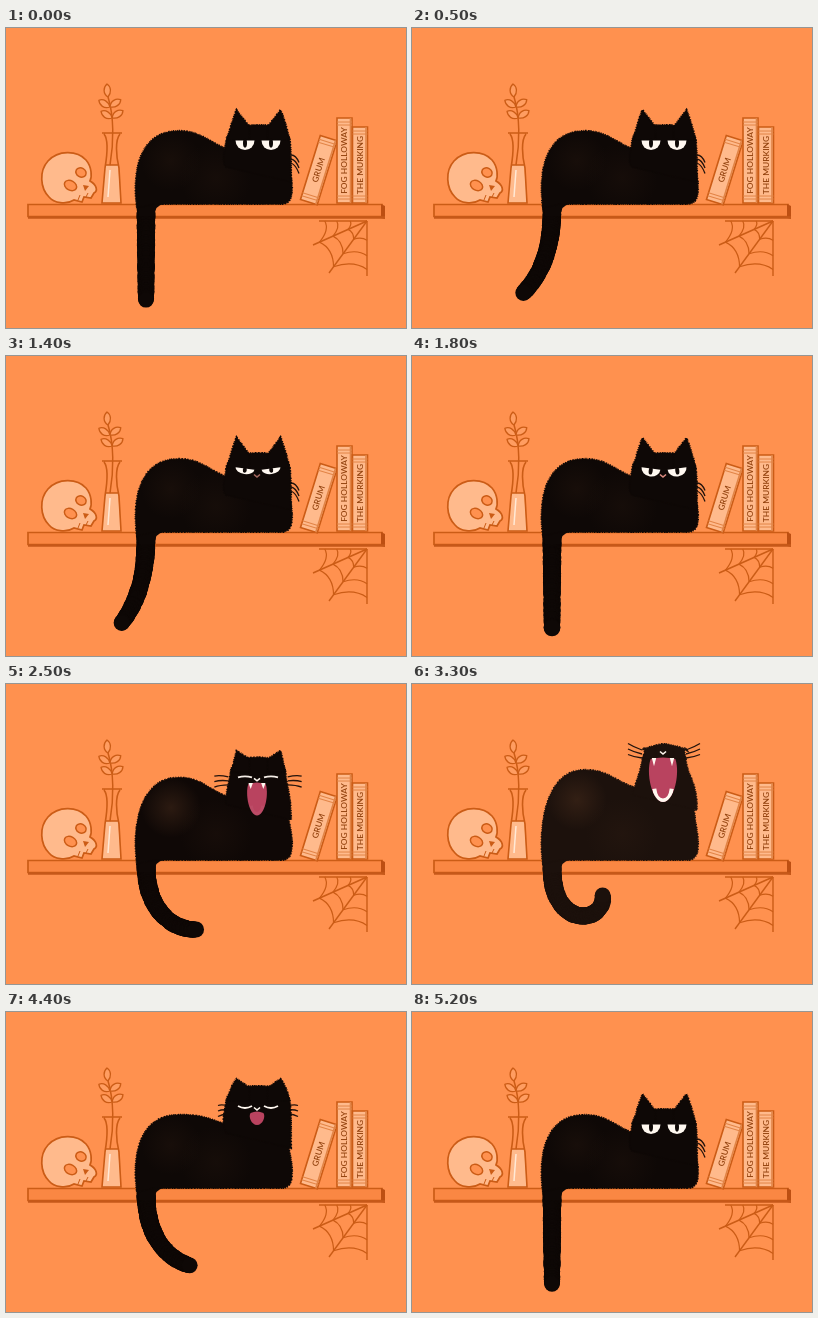
Write an HTML page with a canvas that moves like this. It is 400 px wide and 300 px high and loops after 5.3 s.

```html
<!DOCTYPE html>
<html lang="en">
<head>
<meta charset="utf-8">
<title>Yawning cat on a shelf</title>
<style>
html, body { margin: 0; width: 100%; height: 100%; overflow: hidden; background: #ff914f; }
canvas { display: block; width: 400px; height: 300px; }
</style>
</head>
<body>
<canvas id="stage" width="400" height="300"></canvas>
<script>
const LOOP = 5300, STEP = 100;
const BG = '#ff914f', LINE = '#cb5c16', PALE = '#ffba8c', WHITE = '#fff8f0';
const stage = document.getElementById('stage').getContext('2d');
let ctx = stage;
let fur;

function ramp(t, from, to) {
  const u = Math.min(1, Math.max(0, (t - from) / (to - from)));
  return u * u * (3 - 2 * u);
}

// Rises over the first interval and falls over the second.
const pulse = (t, a, b, c, d) => ramp(t, a, b) - ramp(t, c, d);

function randomFrom(seed) {
  return () => (seed = (seed * 16807 + 11) % 2147483647) / 2147483647;
}

// Raising the head, stretching and tilting it back drive the whole cat.
function poseAt(t) {
  const raise = pulse(t, 1900, 2500, 4400, 4900);
  const stretch = pulse(t, 2100, 2500, 3600, 4300);
  const tilt = pulse(t, 2400, 3200, 3600, 4300);
  const blink = pulse(t, 500, 700, 1200, 1500);
  const glare = pulse(t, 1200, 1400, 2300, 2500);
  const left = Math.sin(Math.PI * Math.min(1, t / 1800));
  const right = pulse(t, 1800, 2600, 4100, 5200);
  return {
    stretch, tilt, raise, glare,
    nose: pulse(t, 1200, 1500, 4600, 4900),
    open: Math.max(0, 1 - blink - raise - glare * 0.15),
    shut: raise * (1 - tilt),
    top: 97 - 23 * raise - 14 * tilt,
    half: 33 - 4 * stretch - 6 * tilt,
    ear: 15 + 3 * blink - 8 * raise - 13 * tilt,
    hump: 103 - 9 * stretch - 8 * tilt,
    shoulder: 121 - 8 * raise - 10 * tilt,
    mouthTop: 119 - 19 * raise - 26 * tilt,
    mouthW: 15 * raise + 5 * stretch + 9 * tilt,
    mouthH: 13 * raise + 19 * stretch + 12 * tilt,
    whiskerX: 285 - 3 * raise - 8 * tilt,
    whiskerY: 131 - 33 * raise - 28 * tilt,
    whiskerDrop: 9 - 8 * raise - 6 * tilt,
    whiskerLen: 8 + 2 * raise + 4 * stretch,
    bend: 1.6 * right + 1.75 * tilt - 1.03 * left,
    curl: 1.5 + tilt / 2,
    tailLength: 96 + 8 * tilt
  };
}

function shape(d, fill, stroke, width = 1.5) {
  const path = typeof d === 'string' ? new Path2D(d) : d;
  if (fill) { ctx.fillStyle = fill; ctx.fill(path); }
  if (stroke) { ctx.strokeStyle = stroke; ctx.lineWidth = width; ctx.stroke(path); }
}

function oval(x, y, rx, ry, turn, fill, stroke) {
  const path = new Path2D();
  path.ellipse(x, y, rx, ry, turn, 0, Math.PI * 2);
  shape(path, fill, stroke);
}

function at(x, y, angle, paint) {
  ctx.save();
  ctx.translate(x, y);
  ctx.rotate(angle);
  paint();
  ctx.restore();
}

function skull() {
  shape('M43 169 C34 160 33 143 42 133 C52 122 71 122 80 132 C86 139 86 149 84 153 C91 157 92 163 88 165 L85 170 L78 169 L76 174 L68 172 C60 177 48 175 43 169Z', PALE, LINE, 1.7);
  oval(64.5, 157.5, 6.5, 4.7, 0.5, BG, LINE);
  oval(75, 144.5, 5.3, 4.5, 0.5, BG, LINE);
  shape('M77 157 L83 158 L79 163Z', LINE);
  shape('M72 172 L74 167 M80 169 L82 165', null, LINE, 1);
}

function vase() {
  shape('M99 137 H112 L115 175 H96Z', PALE);
  shape('M96 105 H116 M98 106 C103 112 101 128 99 140 L96 175 H115 L113 140 C110 128 109 112 114 106 M99 137 H113', null, LINE, 1.6);
  shape('M104 142 L102 169', null, '#ffe9d6', 1.5);
  shape('M104 137 C108 114 108 88 102 69', null, LINE);
  const leaf = (x, y, angle) => at(x, y, angle, () =>
    shape('M0 0 C4 -5 10 -4 13 0 C10 4 4 4 0 0', '#ff9d61', LINE, 1.3));
  leaf(102, 69, -1.65);
  for (const y of [79, 90]) {
    leaf(104 + (y - 79) / 5, y, -2.6);
    leaf(104 + (y - 79) / 5, y, -0.6);
  }
}

function book(x, w, h, lean, title) {
  at(x, lean ? 171.5 : 175, lean, () => {
    shape(`M0 0 H${w} V${-h} H0Z`, PALE, LINE, 1.6);
    for (const y of [4, 7, h - 7, h - 4]) shape(`M0 ${-y} H${w}`, null, '#e28446', 1);
    shape(`M${w - 1.5} 0 V${-h}`, null, '#e28446', 1.6);
    ctx.rotate(-Math.PI / 2);
    ctx.font = '600 8.4px Lato, sans-serif';
    ctx.fillStyle = '#94430f';
    ctx.textAlign = 'center';
    ctx.textBaseline = 'middle';
    ctx.fillText(title, h / 2, w / 2);
  });
}

function web() {
  const spokes = [[-48, 0], [-54, 24], [-38, 52], [0, 55]];
  for (const [x, y] of spokes) shape(`M361 193 l${x} ${y}`, null, LINE, 1.4);
  for (const k of [0.35, 0.63, 0.88]) {
    for (let i = 0; i < 3; i++) {
      const [a, b] = [spokes[i], spokes[i + 1]].map(p => [361 + p[0] * k, 193 + p[1] * k]);
      const sag = (v, c) => (a[v] + b[v]) / 2 * 0.83 + c * 0.17;
      shape(`M${a} Q${sag(0, 361)} ${sag(1, 193)} ${b}`, null, LINE, 1.2);
    }
  }
}

function scene() {
  ctx.fillStyle = BG;
  ctx.fillRect(0, 0, 400, 300);
  web();
  shape('M22 176.5 H376 V188.5 H22Z', '#fa8743', LINE, 1.7);
  shape('M375 176 L379 178 V191 L375 190Z', '#bd4f12');
  shape('M22 189.5 H379', null, '#c65819', 2.6);
  skull();
  vase();
  book(294.5, 17.5, 67, 0.3, 'GRUM');
  book(331, 15, 85, 0, 'FOG HOLLOWAY');
  book(346.5, 15, 76, 0, 'THE MURKING');
}

// An irregular dashed edge reads as short hair.
function furry(d, seed) {
  const random = randomFrom(seed);
  const path = new Path2D(d);
  shape(path, fur, fur, 0.8);
  ctx.setLineDash(Array.from({ length: 30 }, () => 0.5 + random() * 1.3));
  shape(path, null, fur, 2.2);
  ctx.setLineDash([]);
  return path;
}

function tail(p, seed) {
  const random = randomFrom(seed);
  const count = 120, step = p.tailLength / count;
  let x = 140, y = 176;
  for (let i = 0; i <= count; i++) {
    const s = i / count, angle = p.bend * s ** p.curl;
    const r = 8.9 - 1.4 * s + random() * 0.9;
    oval(x, y, r, r, 0, fur);
    x += Math.sin(angle) * step;
    y += Math.cos(angle) * step;
  }
  shape('M131 168 H158 V176 Q149 177 148.5 188 L133 188Z', fur);
}

function glow(x, y, r, alpha) {
  const g = ctx.createRadialGradient(x, y, 0, x, y, r);
  g.addColorStop(0, `rgba(78, 48, 30, ${alpha})`);
  g.addColorStop(1, 'rgba(78, 48, 30, 0)');
  ctx.fillStyle = g;
  ctx.fillRect(x - r, y - r, r * 2, r * 2);
}

function body(p, seed) {
  const { shoulder: s, hump: h } = p;
  const path = furry(`M131 180 C126 142 134 ${h + 1} 171 ${h}
    C194 ${h - 1} 204 ${s - 6} 221 ${s} L280 ${s + 8}
    C284 145 286 150 286 160 C286 171 283 176 275 176 L148 176Z`, seed);
  ctx.save();
  ctx.clip(path);
  glow(165, h + 30, 30, 0.15 + p.stretch * 0.3);
  glow(210, 150, 36, 0.12);
  ctx.restore();
}

function head(p, seed) {
  const { top: y, half: w, ear: e, tilt } = p, x = 252;
  const flat = w * (0.72 - 0.32 * tilt);
  const jaw = Math.max(y + 42, p.shoulder + 8);
  furry(`M220 ${jaw} C${x - w - 4} ${y + 36} ${x - w} ${y + 26} ${x - w + 1} ${y + 17}
    C${x - w + 2} ${y + 6} ${x - flat} ${y} ${x} ${y}
    C${x + flat} ${y} ${x + w - 2} ${y + 6} ${x + w - 1} ${y + 17}
    C${x + w} ${y + 30} 285 ${y + 38} 285 ${jaw + 15}Z`, seed);
  for (const side of [-1, 1]) {
    const px = d => x + 0.5 + side * d;
    furry(`M${px(w - 2)} ${y + 15} Q${px(w - 5)} ${y} ${px(22)} ${y - e}
      Q${px(15)} ${y - e * 0.4} ${px(9)} ${y + 2} L${px(9)} ${y + 15}Z`, seed + side);
  }
}

function eyes(p) {
  for (const side of [-1, 1]) {
    const x = 252 + side * 13, y = p.top + 20, sag = 4 - 6 * p.stretch;
    if (p.open > 0.05) at(x, p.top + 15.5, -side * p.glare * 0.13, () => {
      const lid = new Path2D();
      lid.ellipse(0, 0, 9.5, 9.5 * p.open, 0, 0, Math.PI);
      shape(lid, WHITE);
      oval(0, 2.6 * p.open, 2, 4.6 * p.open, 0, fur);
    });
    ctx.globalAlpha = p.shut;
    shape(`M${x - 7} ${y} Q${x} ${y + sag} ${x + 7} ${y}`, null, WHITE, 1.8);
    ctx.globalAlpha = 1;
  }
}

function mouth(p) {
  const { mouthTop: y, mouthW: w, mouthH: h } = p, x = 251, r = w / 2;
  if (w > 1) {
    const gape = new Path2D(`M${x - r * 0.85} ${y + 1} Q${x} ${y - 2} ${x + r * 0.85} ${y + 1}
      C${x + r * 1.2} ${y + h * 0.35} ${x + r * 0.75} ${y + h} ${x} ${y + h}
      C${x - r * 0.75} ${y + h} ${x - r * 1.2} ${y + h * 0.35} ${x - r * 0.85} ${y + 1}Z`);
    shape(gape, '#b9435f');
    ctx.save();
    ctx.clip(gape);
    ctx.globalAlpha = p.tilt;
    shape(`M${x - r * 0.6} ${y + h * 0.7} Q${x - r * 0.5} ${y + h - 1.5} ${x} ${y + h - 1.5}
      Q${x + r * 0.5} ${y + h - 1.5} ${x + r * 0.6} ${y + h * 0.7}`, null, WHITE, 4);
    ctx.restore();
    ctx.globalAlpha = p.stretch;
    for (const side of [-1, 1]) {
      const fx = x + side * r * 0.62;
      shape(`M${fx - 2.2} ${y} h4.4 l-2.2 ${h * 0.19}Z`, WHITE);
    }
  }
  const ny = p.top + 23 - 14 * p.tilt;
  ctx.globalAlpha = p.nose;
  shape(`M${x - 3} ${ny - 1.5} l3 2.5 l3 -2.5`, null, p.raise > 0.5 ? WHITE : '#dc8b80', 1.6);
  ctx.globalAlpha = 1;
}

function whiskers(p) {
  const { whiskerX: x, whiskerY: y, whiskerDrop: d, whiskerLen: n } = p;
  for (const side of [-1, 1]) {
    const start = side > 0 ? x : 504 - x;
    ctx.globalAlpha = side > 0 ? 1 : p.raise;
    for (const i of [-1, 0, 1]) {
      const sy = y + i * 4;
      shape(`M${start} ${sy} q${side * n * 0.6} ${d * 0.2 + i - 1} ${side * n} ${d + i * 1.5}`, null, '#23130c', 1.3);
    }
  }
  ctx.globalAlpha = 1;
}

const backdrop = document.createElement('canvas');
backdrop.width = 400;
backdrop.height = 300;
ctx = backdrop.getContext('2d');
scene();
ctx = stage;

function draw(t) {
  const p = poseAt(t), seed = 1000 + t;
  fur = `rgb(${14 + 14 * p.tilt}, ${8 + 9 * p.tilt}, ${6 + 6 * p.tilt})`;
  ctx.drawImage(backdrop, 0, 0);
  whiskers(p);
  tail(p, seed);
  body(p, seed);
  head(p, seed);
  eyes(p);
  mouth(p);
}

function tick() {
  draw(Math.floor(performance.now() % LOOP / STEP) * STEP);
  requestAnimationFrame(tick);
}
tick();
</script>
</body>
</html>
```
